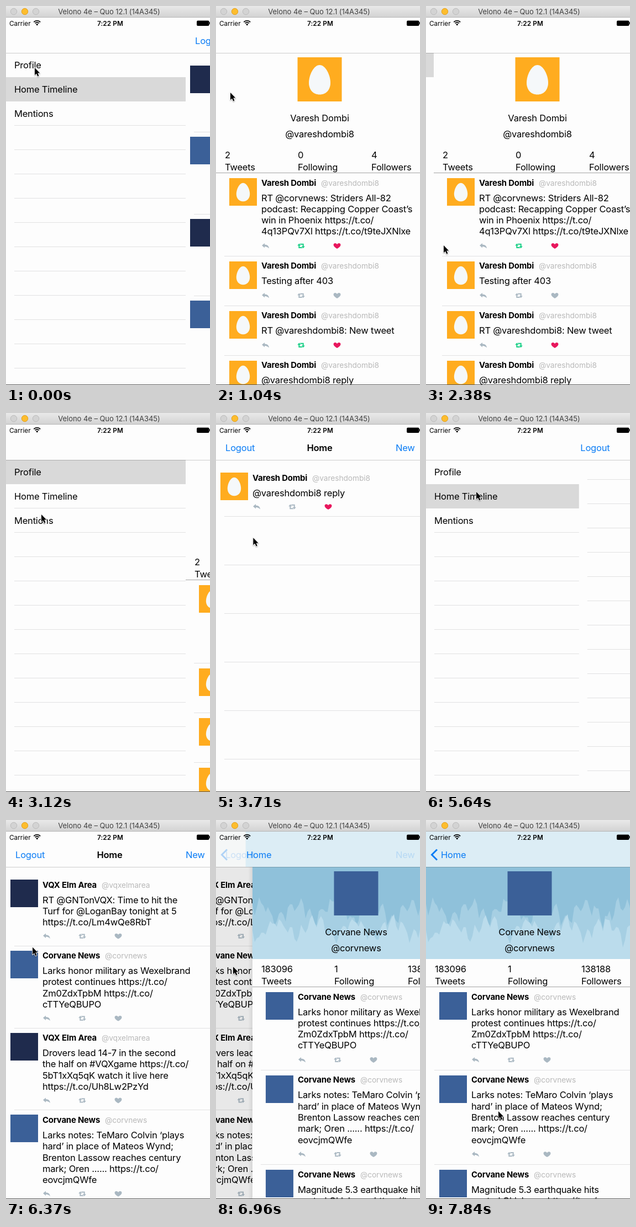
Recreate the animation shown at these times as an HTML page with a canvas. Size 369 by 687 pixels, loop 7.99 s.

```html
<!DOCTYPE html>
<html lang="en">
<head>
<meta charset="utf-8">
<title>Sliding menu demo</title>
<style>
html, body { margin: 0; width: 100%; height: 100%; overflow: hidden; background: #fdfdfd; }
canvas { display: block; width: 369px; height: 687px; }
</style>
</head>
<body>
<canvas id="stage"></canvas>
<script>
const W = 369, H = 687, SCREEN = 375, MENU_W = 325, LOOP = 7990;
const BG = '#fdfdfd', BLUE = '#0a7cf5', RULE = '#e1e1e2', GRAY = '#aab8c2';
const canvas = document.getElementById('stage');
const c = canvas.getContext('2d');
const dpr = window.devicePixelRatio || 1;
canvas.width = W * dpr;
canvas.height = H * dpr;

const egg = { name: 'Varesh Dombi', handle: '@vareshdombi8', counts: ['2', '0', '4'] };
const news = { name: 'Corvane News', handle: '@corvnews', counts: ['183096', '1', '138188'], color: '#3b6098' };
const tv = { name: 'VQX Elm Area', handle: '@vqxelmarea', color: '#1f2b4d' };
const tweet = (user, lines, rt, like) => ({ user, lines, rt, like });

const reply = tweet(egg, ['@vareshdombi8 reply'], false, true);
const honor = tweet(news, ['Larks honor military as Wexelbrand',
  'protest continues https://t.co/', 'Zm0ZdxTpbM https://t.co/', 'cTTYeQBUPO']);
const notes = tweet(news, ['Larks notes: TeMaro Colvin ‘plays', 'hard’ in place of Mateos Wynd;',
  'Brenton Lassow reaches century', 'mark; Oren ...... https://t.co/', 'eovcjmQWfe']);

egg.tweets = [
  tweet(egg, ['RT @corvnews: Striders All-82', 'podcast: Recapping Copper Coast’s',
    'win in Phoenix https://t.co/', '4q13PQv7Xl https://t.co/t9teJXNlxe'], true, true),
  tweet(egg, ['Testing after 403']),
  tweet(egg, ['RT @vareshdombi8: New tweet'], true, true),
  reply
];
news.tweets = [honor, notes,
  tweet(news, ['Magnitude 5.3 earthquake hits', 'central Oklahoma https://t.co/'])];
const homeTweets = [
  tweet(tv, ['RT @GNTonVQX: Time to hit the', 'Turf for @LoganBay tonight at 5', 'https://t.co/Lm4wQe8RbT']),
  honor,
  tweet(tv, ['Drovers lead 14-7 in the second', 'the half on #VQXgame https://t.co/',
    '5bT1xXq5qK watch it live here', 'https://t.co/Uh8Lw2PzYd']),
  notes
];

const cursorPath = [[0, 52, 112], [1, 52, 112], [2, 51, 112], [5, 51, 112], [7, 26, 157],
  [12, 20, 434], [13, 20, 434], [14, 18, 434], [15, 18, 434], [16, 32, 434], [17, 110, 434],
  [18, 190, 400], [19, 165, 310], [20, 95, 215], [21, 64, 184], [24, 64, 184], [30, 84, 437],
  [31, 105, 437], [32, 200, 432], [33, 240, 370], [34, 190, 260], [35, 120, 170],
  [36, 91, 143], [38, 91, 143], [45, 31, 266], [47, 31, 266], [53, 131, 528]];
const dragA = [[15, 0], [16, 14], [17, 92], [18, 230], [19, MENU_W]];
const dragB = [[30, 0], [31, 21], [32, 116], [33, 262], [34, MENU_W]];

const mix = (a, b, p) => a + (b - a) * p;
const tickStart = k => 148.55 * k - 0.012 * k * k;

function along(keys, k) {
  let i = 0;
  while (i < keys.length - 2 && keys[i + 1][0] <= k) i++;
  const a = keys[i], b = keys[i + 1];
  const p = Math.min(1, Math.max(0, (k - a[0]) / (b[0] - a[0])));
  return a.slice(1).map((v, j) => mix(v, b[j + 1], p));
}

// Eased progress of a 0.3 s transition, n ticks after it is first seen.
function slide(n) {
  if (n < 0) return 0;
  const u = Math.min(1, 0.243 + 0.49 * n);
  return u * u * (3 - 2 * u);
}

function rect(x, y, w, h, color) {
  c.fillStyle = color;
  c.fillRect(x, y, w, h);
}

const rule = (x, y, color = RULE) => rect(x, Math.round(y), SCREEN, 1, color);

function text(s, x, y, { size = 16.5, weight = 400, color = '#000', align = 'left', gap = -0.2 } = {}) {
  c.font = `${weight} ${size}px Inter, Roboto, sans-serif`;
  c.letterSpacing = gap + 'px';
  c.textAlign = align;
  c.fillStyle = color;
  c.fillText(s, x, y);
  return c.measureText(s).width;
}

function faded(alpha, draw) {
  if (alpha <= 0) return;
  c.save();
  c.globalAlpha = alpha;
  draw();
  c.restore();
}

function shape(points, color) {
  c.beginPath();
  points.forEach(([x, y]) => c.lineTo(x, y));
  c.closePath();
  c.fillStyle = color;
  c.fill();
}

function avatar(user, x, y, s) {
  rect(x, y, s, s, user.color || '#ffac1f');
  if (user.color) return;
  c.save();
  c.translate(x + s / 2, y + s * 0.525);
  c.scale(s / 80, s / 80);
  c.beginPath();
  c.moveTo(0, -28);
  c.bezierCurveTo(11, -28, 19.5, -9, 19.5, 4);
  c.bezierCurveTo(19.5, 17, 11.5, 25.5, 0, 25.5);
  c.bezierCurveTo(-11.5, 25.5, -19.5, 17, -19.5, 4);
  c.bezierCurveTo(-19.5, -9, -11, -28, 0, -28);
  c.fillStyle = '#f5f8fa';
  c.fill();
  c.restore();
}

function icons(x, y, t) {
  c.save();
  c.translate(x + 7.5, y);
  c.beginPath();
  c.moveTo(-6.5, -0.8);
  c.lineTo(-1.5, -5);
  c.lineTo(-1.5, -2.4);
  c.quadraticCurveTo(6, -2.2, 6.3, 4.6);
  c.quadraticCurveTo(3.5, 1, -1.5, 1);
  c.lineTo(-1.5, 3.5);
  c.closePath();
  c.fillStyle = GRAY;
  c.fill();

  c.translate(64.5, 0);
  for (let i = 0; i < 2; i++) {
    shape([[-6.8, -0.7], [-3.7, -4.4], [-0.6, -0.7], [-2.7, -0.7], [-2.7, 2.2], [1, 2.2],
      [2.6, 4.2], [-4.7, 4.2], [-4.7, -0.7]], t.rt ? '#19cf86' : GRAY);
    c.rotate(Math.PI);
  }

  c.translate(65, 0);
  c.beginPath();
  c.moveTo(0, 5);
  c.bezierCurveTo(-4, 3, -6.5, 0.5, -6.5, -1.8);
  c.bezierCurveTo(-6.5, -5.4, -1.6, -6, 0, -2.6);
  c.bezierCurveTo(1.6, -6, 6.5, -5.4, 6.5, -1.8);
  c.bezierCurveTo(6.5, 0.5, 4, 3, 0, 5);
  c.fillStyle = t.like ? '#e8175d' : GRAY;
  c.fill();
  c.restore();
}

// Draws tweets downwards and returns the y below the last one.
function tweetList(tweets, x, y, inset, pad) {
  for (const t of tweets) {
    const left = x + inset, tx = left + 58;
    avatar(t.user, left, Math.round(y) + 8 + pad / 2, 50);
    const w = text(t.user.name, tx, y + 22.5, { size: 14.8, weight: 700, gap: -0.15 });
    text(t.user.handle, tx + w + 9, y + 22.5, { size: 13.7, color: '#b9b9b9', gap: -0.05 });
    t.lines.forEach((s, i) => text(s, tx, y + 50.5 + i * 20.3));
    const extra = (t.lines.length - 1) * 20.3;
    icons(tx, y + 70 + pad / 2 + extra, t);
    y += 88 + pad + extra;
    rule(x + 15, y - 1);
  }
  return y;
}

function emptyRows(x, y, h) {
  for (y += h - 1; y < H; y += h) rule(x + 15, y);
}

function ridge(x, base, amp, seed, color) {
  const pts = [[x, 252]];
  for (let i = 0; i <= SCREEN; i += 4) {
    const swell = Math.abs(Math.sin(i * 0.045 + seed)) * 0.45 + Math.abs(Math.sin(i * 0.17 + seed * 2)) * 0.35;
    const noise = Math.sin(i * 12.9898 + seed * 78.2) * 43758.5;
    pts.push([x + i, base - amp * (swell + (noise - Math.floor(noise)) * 0.2)]);
  }
  pts.push([x + SCREEN, 252]);
  shape(pts, color);
}

function profile(user, x) {
  rect(x, 85, SCREEN, H, BG);
  if (user === news) {
    rect(x, 85, SCREEN, 167, '#8fc1da');
    ridge(x, 208, 72, 1.2, '#a6cfe3');
    ridge(x, 236, 66, 2.7, '#bbdcec');
  }
  avatar(user, x + 147.5, 93, 80);
  text(user.name, x + 187.5, 209, { align: 'center' });
  text(user.handle, x + 187.5, 237.5, { align: 'center' });
  ['Tweets', 'Following', 'Followers'].forEach((label, i) => {
    const cx = x + [16, 148, 281][i];
    text(user.counts[i], cx, 276);
    text(label, cx, 298);
  });
  tweetList(user.tweets, x, 303, 24, 2);
  rule(x, 302, '#a2a2a2');
}

function homeNav(x, p, push) {
  faded(1 - push, () => {
    text('Logout', x + 17 * p, 69, { color: BLUE });
    text('New', x + 325, 69, { color: BLUE });
  });
  if (!push) text('Home', x + 187.5, 69, { weight: 600, align: 'center' });
}

function timeline(tweets, x, p, loaded, top) {
  rect(x, 21, SCREEN, H, BG);
  if (!loaded) return emptyRows(x, mix(73, top, p), 44);
  const end = tweetList(tweets, x, top, 8, 0);
  if (end < H) emptyRows(x, end, 88);
}

function menu(selected) {
  rect(0, 85 + selected * 44, MENU_W, 44, '#d9d9d9');
  ['Profile', 'Home Timeline', 'Mentions'].forEach((s, i) => text(s, 15, 112.5 + i * 44));
  for (let i = 0; i < 13; i++) {
    if (i !== selected && i !== selected - 1) rule(15, 128 + i * 44);
  }
}

function pushedNav(push) {
  // The bar's tint runs slightly ahead of the sliding page.
  rect(SCREEN * (1 - push) - 70 * (1 - push), 21, SCREEN + 70, 64, '#dcedf5');
  faded(Math.max(0, (push - 0.75) * 4), () => {
    c.beginPath();
    c.moveTo(20, 53.5);
    c.lineTo(10.5, 63);
    c.lineTo(20, 72.5);
    c.strokeStyle = BLUE;
    c.lineWidth = 3;
    c.stroke();
  });
  const x = mix(186, 27, push);
  faded(1 - push * 2, () => text('Home', x, 69, { weight: 600 }));
  faded(Math.min(1, push * 2), () => text('Home', x, 69, { color: BLUE }));
}

function chrome() {
  const g = c.createLinearGradient(0, 0, 0, 21);
  g.addColorStop(0, '#e9e9e9');
  g.addColorStop(1, '#d2d2d2');
  rect(0, 0, W, 21, g);
  rect(0, 20, W, 1, '#b6b6b6');
  ['#d3d3d3', '#fdbd2e', '#d3d3d3'].forEach((color, i) => {
    c.beginPath();
    c.arc(14 + i * 20, 10, 5.7, 0, 7);
    c.fillStyle = color;
    c.fill();
    c.strokeStyle = i === 1 ? '#dfa023' : '#bcbcbc';
    c.lineWidth = 1;
    c.stroke();
  });
  text('Velono 4e – Quo 12.1 (14A345)', 186.5, 15, { size: 13, color: '#404040', align: 'center', gap: -0.05 });

  text('Carrier', 6, 35.5, { size: 11.8, gap: 0 });
  text('7:22 PM', 188.5, 35.5, { size: 11.8, weight: 600, align: 'center', gap: 0.1 });
  c.strokeStyle = '#000';
  c.lineWidth = 1.8;
  for (const r of [5.2, 8.4]) {
    c.beginPath();
    c.arc(56.2, 35, r, -Math.PI * 0.75, -Math.PI * 0.25);
    c.stroke();
  }
  c.beginPath();
  c.moveTo(56.2, 35.5);
  c.arc(56.2, 35.5, 3, -Math.PI * 0.75, -Math.PI * 0.25);
  c.fillStyle = '#000';
  c.fill();
  c.beginPath();
  c.roundRect(345, 26.5, 22.5, 9.5, 2);
  c.fill();
  rect(368, 29, 1, 4, '#000');
  rect(0, 686, W, 1, '#5a5a5a');
}

function cursor(x, y) {
  c.save();
  c.translate(x, y);
  c.scale(0.88, 0.88);
  c.beginPath();
  [[0, 0], [0, 15], [3.4, 11.8], [6, 17.5], [8.4, 16.5], [6, 10.8], [10.5, 10.8]].forEach(p => c.lineTo(...p));
  c.closePath();
  c.lineJoin = 'round';
  c.strokeStyle = '#fff';
  c.lineWidth = 2;
  c.shadowColor = 'rgba(0,0,0,.35)';
  c.shadowBlur = 2;
  c.shadowOffsetY = 1;
  c.stroke();
  c.shadowColor = 'transparent';
  c.fillStyle = '#000';
  c.fill();
  c.restore();
}

function panelX(k, p) {
  if (k >= 15 && k < 23) return along(dragA, k)[0];
  if (k >= 30 && k < 38) return along(dragB, k)[0];
  return MENU_W * (1 - p);
}

function draw(k) {
  const opened = k < 5 ? -9 : k < 23 ? 5 : k < 38 ? 23 : 38;
  const view = { 5: 'profile', 23: 'mentions' }[opened] || 'home';
  const p = slide(k - opened);
  const settled = k < 5 ? 1 : p;
  const x = k < 5 ? MENU_W : panelX(k, p);
  const loaded = k - opened >= 2;
  const push = slide(k - 46);

  c.setTransform(dpr, 0, 0, dpr, 0, 0);
  rect(0, 0, W, H, BG);
  if (x > 0) menu({ profile: 0, home: 1, mentions: 2 }[view]);

  if (view === 'profile') {
    profile(egg, x);
  } else {
    const px = x - SCREEN * 0.3 * push;
    timeline(view === 'home' ? homeTweets : [reply], px, settled, loaded, 100);
    if (push) {
      rect(0, 21, W, H, `rgba(0,0,0,${0.1 * push})`);
      rect(0, 21, W, 64, 'rgba(250,252,253,.75)');
      const nx = SCREEN * (1 - push);
      if (nx > 0) {
        const g = c.createLinearGradient(nx - 8, 0, nx, 0);
        g.addColorStop(0, 'rgba(0,0,0,0)');
        g.addColorStop(1, 'rgba(0,0,0,.08)');
        rect(nx - 8, 85, 8, H, g);
      }
      profile(news, nx);
      pushedNav(push);
    }
    homeNav(x, settled, push);
  }
  rect(0, 85, W, 1, 'rgba(0,0,0,.2)');
  chrome();
  cursor(...along(cursorPath, k));
}

let shown = -1;
function loop(now) {
  const t = now % LOOP;
  let k = 0;
  while (k < 53 && tickStart(k + 1) <= t) k++;
  if (k !== shown) draw(shown = k);
  requestAnimationFrame(loop);
}
draw(0);
requestAnimationFrame(loop);
</script>
</body>
</html>
```
